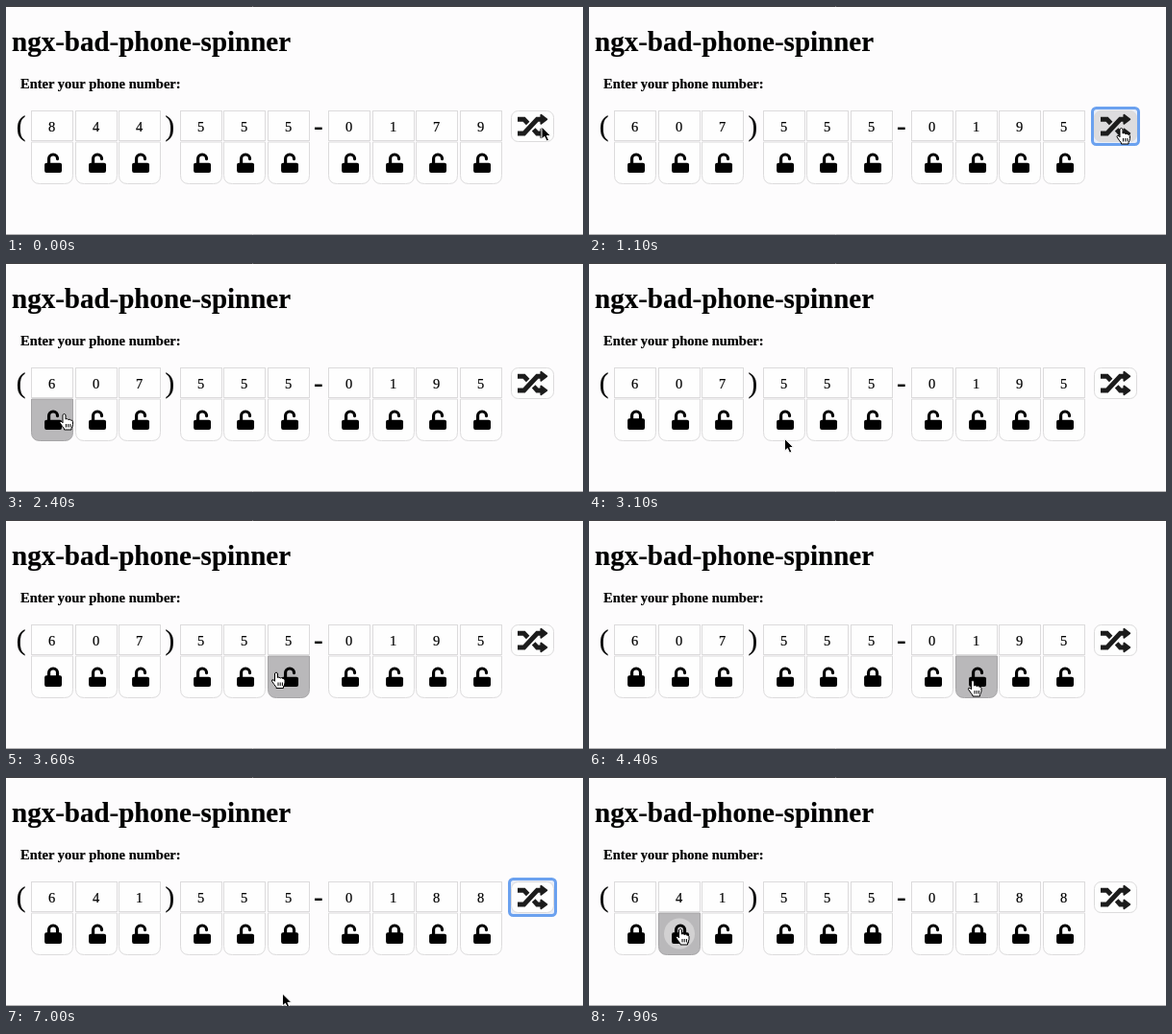
An HTML page for the animation above (8 s loop, 600x239 px).

```html
<!DOCTYPE html>
<html lang="en">
<head>
<meta charset="utf-8">
<title>ngx-bad-phone-spinner</title>
<style>
  html, body { margin: 0; width: 100%; height: 100%; overflow: hidden; background: #fdfcfd; }
  svg { display: block; font-family: "Liberation Serif", "Times New Roman", serif; }
  text { stroke: #000; stroke-width: .2; }
  .big { font-size: 29px; }
  .small { font-size: 14.5px; }
  .bold { font-weight: bold; }
  .digit { text-anchor: middle; }
  .line { stroke: #dcdbdc; fill: #fefefe; }
  .pad.hover { stroke: #a5a4a6; fill: #b9b8ba; }
  #button.hover { fill: #dddcde; }
  .shackle { fill: none; stroke: #000; stroke-width: 80; stroke-linecap: round; }
</style>
</head>
<body>
<svg width="600" height="239" viewBox="0 0 600 239">
  <path d="M0 .5H600" stroke="#3c3b3e"/>
  <path d="M0 238.5H600" stroke="#b4b3b5"/>
  <text class="big bold" x="6" y="46.7">ngx-bad-phone-spinner</text>
  <text class="small bold" x="15" y="86">Enter your phone number:</text>
  <text class="big" x="10.8" y="135">(</text>
  <text class="big" x="165.5" y="135">)</text>
  <text class="big" x="320" y="135">-</text>
  <g id="cells"></g>
  <rect id="ring" x="523.5" y="106.5" width="48" height="38" rx="4" fill="#e9eef8" stroke="#6ba1ef" stroke-width="3"/>
  <rect id="button" class="line" x="525.5" y="109.5" width="44" height="32" rx="7"/>
  <g transform="translate(532 110) scale(.061)" fill="none" stroke="#1c1c1c" stroke-width="80">
    <path d="M0 376H109L334 136H400M0 136H109L175 204M273 308L334 376H400"/>
    <path d="M400 64V208L496 136ZM400 304V448L496 376Z" fill="#1c1c1c" stroke-width="32" stroke-linejoin="round"/>
  </g>
  <g id="cursor" stroke-linejoin="round">
    <path id="arrow" d="M0 0V13L3 10.3L5.2 15L7.5 14L5.4 9.4H9.4Z" stroke="#fff"/>
    <path id="hand" fill="#fff" stroke="#000" d="M-1.5 1Q0 -1 1.5 1V5.5Q3 4.3 4.2 6Q5.8 5 6.8 6.6Q8.5 6 9 8V11Q8.5 13.5 7.5 15V16.5H0V15.5Q-2 13 -4.5 9.2Q-4.8 7 -2.5 8L-1.5 9.3ZM2 10.5V14M4.2 10.5V14M6.4 10.5V14"/>
  </g>
</svg>
<script>
const LOOP = 8000, STEP = 100;
const $ = id => document.getElementById(id);

const spins = [700, 900, 1100, 5400, 5600, 6600];
const lockTimes = { 0: 2500, 5: 3800, 7: 4500, 1: 7900 };

// Each move of the pointer is eased and bows downwards by `sag`.
const moves = [
  { from: 300, to: 500, x: 553.5, y: 127.5, sag: 0 },
  { from: 1200, to: 2100, x: 60.5, y: 157.5, sag: 22 },
  { from: 2500, to: 3500, x: 281, y: 159, sag: 26 },
  { from: 3900, to: 4400, x: 399, y: 167.5, sag: 20 },
  { from: 4500, to: 5000, x: 556.5, y: 119.5, sag: 40 },
  { from: 6500, to: 7400, x: 95, y: 158.5, sag: 85 }
];

function pointer(t) {
  let x = 557, y = 126;
  for (const m of moves) {
    const k = Math.min(1, Math.max(0, (t - m.from) / (m.to - m.from)));
    const ease = k * k * (3 - 2 * k);
    x += (m.x - x) * ease;
    y += (m.y - y) * ease + m.sag * Math.sin(Math.PI * k);
  }
  return [x, y];
}

// The exchange stays 555-01, the other digits are drawn anew by each spin until locked.
function digit(i, t) {
  if (i > 2 && i < 8) return "55501"[i - 3];
  const spin = spins.filter(s => s <= Math.min(t, lockTimes[i] ?? LOOP)).length;
  const r = Math.sin(spin * 12.9898 + i * 78.233 + 5) * 43758.5453;
  return Math.floor((r - Math.floor(r)) * 10);
}

const inside = ([px, py], x, y, w, h) => px >= x && px <= x + w && py >= y && py <= y + h;
const show = (el, on) => el.style.display = on ? "" : "none";

const cells = Array.from({ length: 10 }, (_, i) => {
  const group = Math.min(2, Math.floor(i / 3));
  const x = Math.round(26 + 45.5 * i + 18 * group) + .5;
  const g = document.createElementNS("http://www.w3.org/2000/svg", "g");
  g.setAttribute("transform", `translate(${x} 109.5)`);
  g.innerHTML = `<rect class="line" width="43" height="31"/>
    <path class="line pad" d="M0 32.5H43V67Q43 76 34 76H9Q0 76 0 67Z"/>
    <circle class="ripple" cx="21.5" cy="54" fill="#d2d1d2"/>
    <g transform="translate(13.6 43.9) scale(.04)">
      <path class="shackle"/><rect class="body" width="448" rx="48"/>
    </g>
    <text class="small digit" x="21" y="21.5"></text>`;
  $("cells").append(g);
  const part = name => g.querySelector("." + name);
  return { x, pad: part("pad"), ripple: part("ripple"), shackle: part("shackle"), body: part("body"), digit: part("digit") };
});

function draw(t) {
  const before = pointer(t - STEP); // hover shows one step late
  const onButton = t >= 400 && inside(before, 525, 109, 45, 33);
  let overAny = onButton;

  cells.forEach((c, i) => {
    const hover = inside(before, c.x, 142, 43, 44);
    const age = t - (lockTimes[i] ?? LOOP), locked = age >= 0;
    overAny ||= hover;
    c.digit.textContent = digit(i, t);
    c.pad.classList.toggle("hover", hover);
    c.shackle.setAttribute("d", `M112 260V152A112 112 0 0 1 336 152V${locked ? 260 : 154}`);
    c.body.setAttribute("y", locked ? 224 : 256);
    c.body.setAttribute("height", locked ? 288 : 256);
    show(c.ripple, hover && locked && age < 200);
    c.ripple.setAttribute("r", 16 + Math.max(0, age) / 25);
    c.ripple.setAttribute("opacity", 1 - Math.max(0, age) / 200);
  });

  show($("ring"), (t >= 700 && t < 2400) || (t >= 5300 && t < 7800));
  $("button").classList.toggle("hover", onButton);
  show($("hand"), overAny);
  show($("arrow"), !overAny);
  $("cursor").setAttribute("transform", `translate(${pointer(t)})`);
}

const start = performance.now();
function tick() {
  const t = (performance.now() - start) % LOOP;
  draw(Math.floor(t / STEP) * STEP);
  requestAnimationFrame(tick);
}
tick();
</script>
</body>
</html>
```
